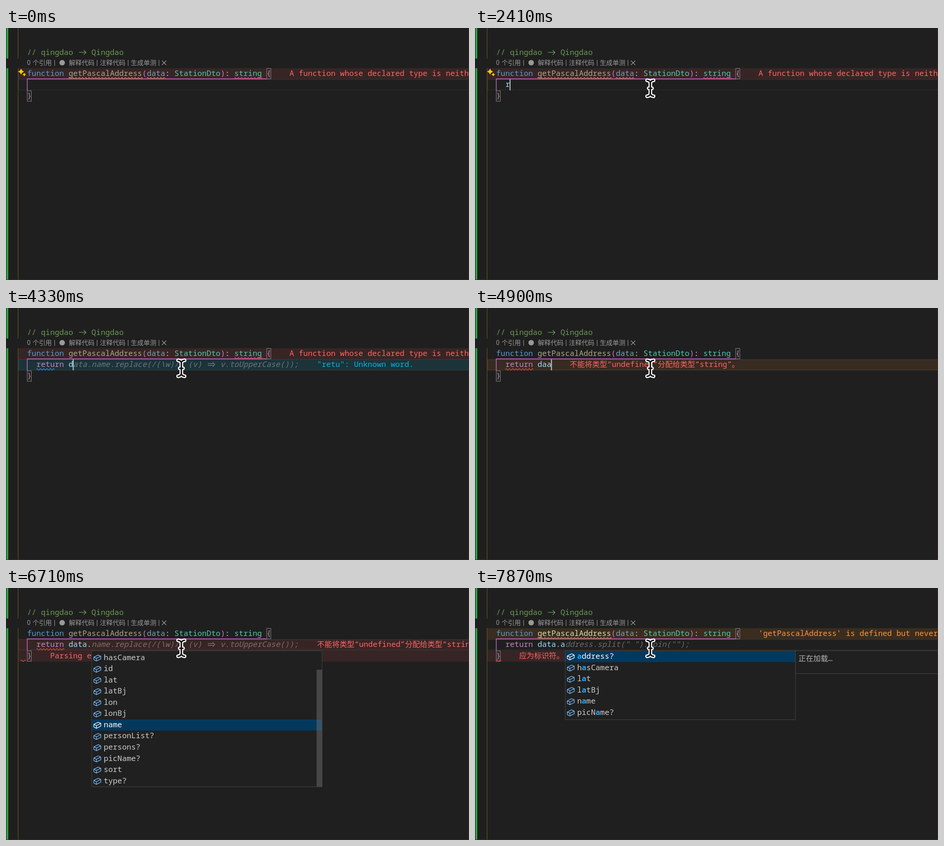
Animation of 1014x552 px, one loop 8 s. Source, as an HTML page:

```html
<!DOCTYPE html>
<html lang="zh">
<head>
<meta charset="utf-8">
<title>Editor</title>
<style>
html, body { margin: 0; width: 100%; height: 100%; overflow: hidden; background: #1f1f1f; }
svg { display: block; width: 1014px; height: 552px; }
text { white-space: pre; font-family: "Noto Sans Mono", "DejaVu Sans Mono", monospace; }
.cjk { font-family: "Noto Sans CJK SC", "Noto Sans CJK", sans-serif; }
</style>
</head>
<body>
<svg viewBox="0 0 1014 552">
  <g id="scene"></g>
  <path d="M0 551.5H1013.5V0" fill="none" stroke="#4d2626"/>
  <g id="mouse" fill="none" stroke-linecap="round" stroke-linejoin="round">
    <path d="M-7-17.5Q-1-17 0-12Q1-17 7-17.5M0-12V12M-7 17.5Q-1 17 0 12Q1 17 7 17.5M-3.5 0H3.5" stroke="#fff" stroke-width="8"/>
    <path d="M-7-17.5Q-1-17 0-12Q1-17 7-17.5M0-12V12M-7 17.5Q-1 17 0 12Q1 17 7 17.5M-3.5 0H3.5" stroke="#111" stroke-width="3.2"/>
  </g>
</svg>
<script>
const LOOP = 8000, X0 = 46.3, CH = 10.08, SIZE = 16.8, ROW = 24.55;
const TINT = { err: 'rgba(228,85,84,.12)', hot: 'rgba(255,140,60,.115)', warn: 'rgba(255,148,47,.12)', info: 'rgba(0,183,228,.13)' };
const INK = { err: '#ff6464', hot: '#ff6464', warn: '#fa973a', info: '#00b7e4' };
const BLUE = '#75beff', DIM = '#a0a0a0';

const col = n => X0 + n * CH;
const esc = s => s.replace(/&/g, '&amp;').replace(/</g, '&lt;').replace(/>/g, '&gt;');
const rect = (x, y, w, h, fill, more = '') => `<rect x="${x}" y="${y}" width="${w}" height="${h}" fill="${fill}" ${more}/>`;
const line = (d, color, w = 1.3, more = '') => `<path d="${d}" fill="none" stroke="${color}" stroke-width="${w}" ${more}/>`;
const at = (x, y, body) => `<g transform="translate(${x} ${y})">${body}</g>`;

function txt(x, y, s, fill, size = SIZE, more = '') {
  const body = esc(s).replace(/[\u3000-\u9fff]+/g,
    m => `<tspan class="cjk" font-size="${size * .975}">${m}</tspan>`);
  return `<text x="${x}" y="${y}" fill="${fill}" font-size="${size}" ${more}>${body}</text>`;
}

// Code text in which two-character arrows are drawn as one wide arrow
function code(x, y, s, fill, more = '') {
  let out = '';
  const plain = s.replace(/[-=]>/g, (m, i) => {
    const a = x + i * CH + 2.5, b = a + 15.5, c = y - 5.6;
    const shaft = m[0] === '-' ? `M${a} ${c}H${b}` : `M${a} ${c - 2}H${b - 2}M${a} ${c + 2}H${b - 2}`;
    out += line(`${shaft}M${b - 5} ${c - 5}L${b} ${c}L${b - 5} ${c + 5}`, fill, 1.4);
    return '  ';
  });
  return txt(x, y, plain, fill, SIZE, more) + out;
}

function wave(x1, x2, y, color) {
  let d = `M${x1} ${y}`;
  for (let x = x1, up = 1; x < x2 - 1; x += 3.6, up = -up) d += `q1.8 ${-3.4 * up} 3.6 0`;
  return line(d, color, 1.3);
}

const box = 'M-7.6-1.6L2-6.2L7.6-3.6V2.4L-2 7L-7.6 4.2ZM-7.6-1.6L-2 1.2L7.6-3.6M-2 1.2V7';
const icons = {
  field: c => line(box, c, 1.3, 'stroke-linejoin="round"'),
  variable: c => line('M-5-5.5H-7.6V5.5H-5M5-5.5H7.6V5.5H5', c)
    + `<g transform="scale(.58)">${line(box, c, 2.1, 'stroke-linejoin="round"')}</g>`,
  class: c => line('M-7-2L-3-6L0-3L-4 1ZM-1-1H4M1-1V5H4M4-1L6-3L8-1L6 1ZM4 5L6 3L8 5L6 7Z', c)
};

const LIBS = [
  ['data'], ['dataTool', 'echarts'], ['dataType', 'element-plus/es/components/table-v2/s…'],
  ['DataTransfer'], ['DataTransferItem'], ['DataTransferItemList'], ['DataView'],
  ['DataLabel', 'node_modules/@visactor/vtable/es/vren…', 'class'],
  ['DataSource', 'node_modules/@visactor/vtable/es/data'],
  ['DataStatistics', '@visactor/vtable'], ['DataTile', 'ol/DataTile'], ['DataTile', 'ol/source']
];
const names = s => s.split(' ').map(n => [n, '', 'field']);
const POPUPS = {
  libs: { x: 177.5, h: 298, y: 149.6, sel: 0, hit: 'data', items: LIBS, bar: [138, 24.5] },
  props: { x: 187.7, h: 298, y: 152.2, sel: 6, items: names('hasCamera id lat latBj lon lonBj name personList? persons? picName? sort type?'), bar: [179, 256] },
  match: { x: 197.5, h: 151, y: 149.6, sel: 0, hit: 'a', items: names('address? hasCamera lat latBj name picName?') }
};

function popup(p) {
  const w = 504.5;
  let out = rect(p.x, 137.5, w, p.h, '#202020', 'stroke="#454545"');
  p.items.forEach(([name, path, kind = 'variable'], i) => {
    const y = p.y + i * ROW, on = i === p.sel, x = p.x + 26.2;
    if (on) out += rect(p.x + .5, y - 11.6, w - 1, 24.4, '#04395e');
    out += at(p.x + 12.3, y + .8, icons[kind](on ? '#fff' : kind === 'class' ? '#ee9d28' : BLUE));
    const n = p.hit ? name.toLowerCase().indexOf(p.hit) : -1, end = n + (p.hit || '').length;
    const ink = on ? '#fff' : '#ccc';
    if (n < 0) out += txt(x, y + 5.4, name, ink);
    else out += txt(x, y + 5.4, name.slice(0, n), ink)
      + txt(x + n * CH, y + 5.4, name.slice(n, end), '#2aaaff', SIZE, 'font-weight="700"')
      + txt(x + end * CH, y + 5.4, name.slice(end), ink);
    if (path) out += txt(p.x + 491.8, y + 4.8, path, DIM, 14.3, 'text-anchor="end"');
  });
  if (p.bar) out += rect(p.x + 492.5, p.bar[0], 12, p.bar[1], 'rgba(121,121,121,.42)');
  return out;
}

function detail(p, kind) {
  const x = p.x + 504.5, full = kind === 'full';
  return rect(x, 137.5, 400, full ? 79 : 50, '#202020', 'stroke="#454545"')
    + (full ? txt(x + 7, 160, '(property) StationDto.name:', '#ccc') + txt(x + 7, 184, 'string', '#ccc')
            : txt(x + 6.5, 159.5, '正在加载…', '#b4b4b4', 16.6));
}

const GHOST = 'data.name.replace(/(\\w)/, (v) => v.toUpperCase());';
const TYPE_ERR = ['hot', '不能将类型“undefined”分配给类型“string”。'];
const RETU = ['info', '"retu": Unknown word.'];
const PARSE = ['err', 'Parsing error: Identifier expected.'];
const IDENT = ['err', '应为标识符。'];
const NEITHER = ['err', 'A function whose declared type is neither'];
const UNUSED = ['warn', "'getPascalAddress' is defined but never used."];

// Each entry changes part of the editor state from its time on
const steps = [
  [0, { typed: '', ghost: '', m1: NEITHER, m2: null, m3: null, spark: 1, boxes: 1, caret: 0, fnInk: '#a8a887', fnWave: 1, argWave: 1, pop: '', info: '' }],
  [50, { boxes: 0 }],
  [1760, { caret: 1 }],
  [1810, { boxes: 1 }],
  [2150, { caret: 0 }],
  [2410, { typed: 'r', caret: 1 }],
  [2500, { spark: 0 }],
  [2590, { typed: 're' }],
  [2680, { fnWave: 0, argWave: 0 }],
  [2780, { typed: 'ret' }],
  [2960, { typed: 'retu' }],
  [3100, { m2: RETU }],
  [3180, { typed: 'retur' }],
  [3350, { typed: 'return' }],
  [3480, { typed: 'return ' }],
  [3700, { ghost: GHOST }],
  [4000, { caret: 0 }],
  [4330, { typed: 'return d', ghost: GHOST.slice(1), caret: 1 }],
  [4560, { typed: 'return da', ghost: GHOST.slice(2) }],
  [4770, { typed: 'return daa', ghost: '' }],
  [4830, { m1: null, m2: null }],
  [4900, { m2: TYPE_ERR }],
  [5080, { typed: 'return da' }],
  [5150, { ghost: GHOST.slice(2) }],
  [5220, { m1: UNUSED, fnWave: 1 }],
  [5430, { typed: 'return dat', ghost: GHOST.slice(3) }],
  [5570, { typed: 'return data', ghost: GHOST.slice(4) }],
  [5850, { caret: 0 }],
  [5930, { pop: 'libs' }],
  [6020, { info: 'load' }],
  [6190, { caret: 1 }],
  [6370, { typed: 'return data.', ghost: '', pop: '', info: '' }],
  [6440, { ghost: GHOST.slice(5) }],
  [6510, { pop: 'props' }],
  [6580, { m1: null, fnWave: 0 }],
  [6650, { m2: ['err', TYPE_ERR[1]], m3: PARSE }],
  [6710, { caret: 0 }],
  [6790, { info: 'load' }],
  [7000, { info: 'full' }],
  [7100, { m1: UNUSED, fnWave: 1 }],
  [7220, { m3: IDENT }],
  [7430, { typed: 'return data.a', ghost: '', caret: 1, info: '' }],
  [7540, { pop: 'match' }],
  [7650, { ghost: 'ddress.split(" ").join("");' }],
  [7760, { m2: null, fnInk: '#dcdcaa' }],
  [7870, { caret: 0, info: 'load' }]
];
const states = [];
steps.forEach(([, patch], i) => states.push({ ...states[i - 1], ...patch }));

const star = (x, y, r) => `<path transform="translate(${x} ${y}) scale(${r})" fill="#ffcc00" d="M0-1Q.2-.2 1 0Q.2.2 0 1Q-.2.2-1 0Q-.2-.2 0-1Z"/>`;

function lens() {
  const t = (x, s) => `<text class="cjk" x="${x}" y="81" fill="#999" font-size="14">${s}</text>`;
  const bars = [106.5, 199.5, 267.5, 335].map(x => line(`M${x} 70V83`, '#999', 1.1)).join('');
  return t(46, '0') + t(58.3, '个引用') + t(137.7, '解释代码') + t(205.5, '注释代码') + t(273.3, '生成单测')
    + bars + '<circle cx="123" cy="76" r="6" fill="#999"/>' + line('M341.5 71.5L351 81M351 71.5L341.5 81', '#999', 1.3);
}

function backdrop() {
  let out = '';
  for (const [y, h] of [[0, 67], [88, 464]])
    out += rect(1, y, 4, h, '#2ea043') + rect(26, y, 1, h, '#70591a');
  return out + code(X0, 59, '// qingdao -> Qingdao', '#6a9955') + lens();
}

function signature(fnInk) {
  const parts = [['function ', '#569cd6'], ['getPascalAddress', fnInk], ['(', '#da70d6'], ['data', '#789fb3'], [': ', '#d4d4d4'],
    ['StationDto', '#4ec9b0'], [')', '#da70d6'], [': ', '#d4d4d4'], ['string', '#4ec9b0'], [' {', '#da70d6']];
  let n = 0;
  return parts.map(([s, c]) => { const x = col(n); n += s.length; return txt(x, 104.7, s, c); }).join('');
}

function body(s) {
  const kw = s.typed.startsWith('return');
  const head = kw ? 'return' : s.typed, rest = s.typed.slice(head.length);
  const dot = rest.indexOf('.');
  let out = txt(col(2), 129.3, head, kw ? '#c586c0' : '#9cdcfe') + txt(col(8), 129.3, rest.replace('.', ' '), '#9cdcfe');
  if (dot >= 0) out += txt(col(8 + dot), 129.3, '.', '#d4d4d4');
  const end = 2 + s.typed.length;
  if (s.ghost) out += code(col(end), 129.3, s.ghost, 'rgba(255,255,255,.34)', 'font-style="italic"');
  if (s.m2) {
    const info = s.m2[0] === 'info';
    out += txt(col(end + s.ghost.length + 4), 129.3, s.m2[1], INK[s.m2[0]])
      + wave(col(2), col(info ? 6 : 8), 134.5, info ? '#3794ff' : '#f14c4c');
  }
  if (s.caret) out += rect(col(end) - .8, 112.5, 2, 24, '#c8c8c8');
  return out;
}

function draw(s) {
  const tint = (m, y) => m ? rect(27, y, 987, 24.5, TINT[m[0]]) : '';
  let out = rect(28, 113, 1000, 22.6, 'none', 'stroke="#282828" stroke-width="2"')
    + tint(s.m1, 88) + tint(s.m2, 112.3) + tint(s.m3, 136.8) + backdrop();
  if (s.boxes) {
    const edge = 'stroke="#888"';
    out += rect(571, 88.5, 9, 23, 'rgba(0,100,0,.1)', edge) + rect(46.5, 137.5, 9, 23, 'rgba(0,100,0,.1)', edge);
  }
  out += signature(s.fnInk);
  if (s.m1) out += txt(col(57), 104.7, s.m1[1], INK[s.m1[0]]);
  if (s.fnWave) out += wave(col(9), col(25), 110, '#cca700');
  if (s.argWave) out += wave(col(26), col(30), 110, '#cca700');
  if (s.m1 === NEITHER) out += wave(col(45), col(51), 110, '#f14c4c');
  out += line('M571 111.5H46.5V137', '#da70d6', 1.3);
  if (s.spark) out += star(33, 95.5, 7) + star(40, 102, 4.2);
  out += txt(X0, 153.7, '}', '#da70d6') + body(s);
  if (s.m3) {
    const left = s.m3 === PARSE ? 32 : 46;
    out += txt(col(5), 153.7, s.m3[1], INK.err) + wave(left, left + 10, 159.5, '#f14c4c');
  }
  const p = POPUPS[s.pop];
  if (p) out += popup(p) + (s.info ? detail(p, s.info) : '');
  return out;
}

// Pointer path: time, x, y
const path = [[370, 456, 272], [420, 450, 262], [520, 437, 241], [750, 437, 241], [900, 425, 237], [1050, 400, 228],
  [1200, 379, 205], [1320, 375, 180], [1420, 380, 156], [1500, 384, 144], [1760, 384, 144], [1810, 384, 132], [LOOP, 384, 132]];

function pointer(t) {
  const i = path.findIndex(p => p[0] > t);
  const [a, x, y] = path[i - 1], [b, u, v] = path[i], k = (t - a) / (b - a);
  return [x + (u - x) * k, y + (v - y) * k];
}

const scene = document.getElementById('scene'), mouse = document.getElementById('mouse');
let shown = -1;
function tick() {
  const t = performance.now() % LOOP;
  let i = steps.length - 1;
  while (steps[i][0] > t) i--;
  if (i !== shown) { scene.innerHTML = draw(states[i]); shown = i; }
  mouse.style.display = t < 370 ? 'none' : '';
  if (t >= 370) mouse.setAttribute('transform', `translate(${pointer(t).join(' ')})`);
  requestAnimationFrame(tick);
}
tick();
</script>
</body>
</html>
```
